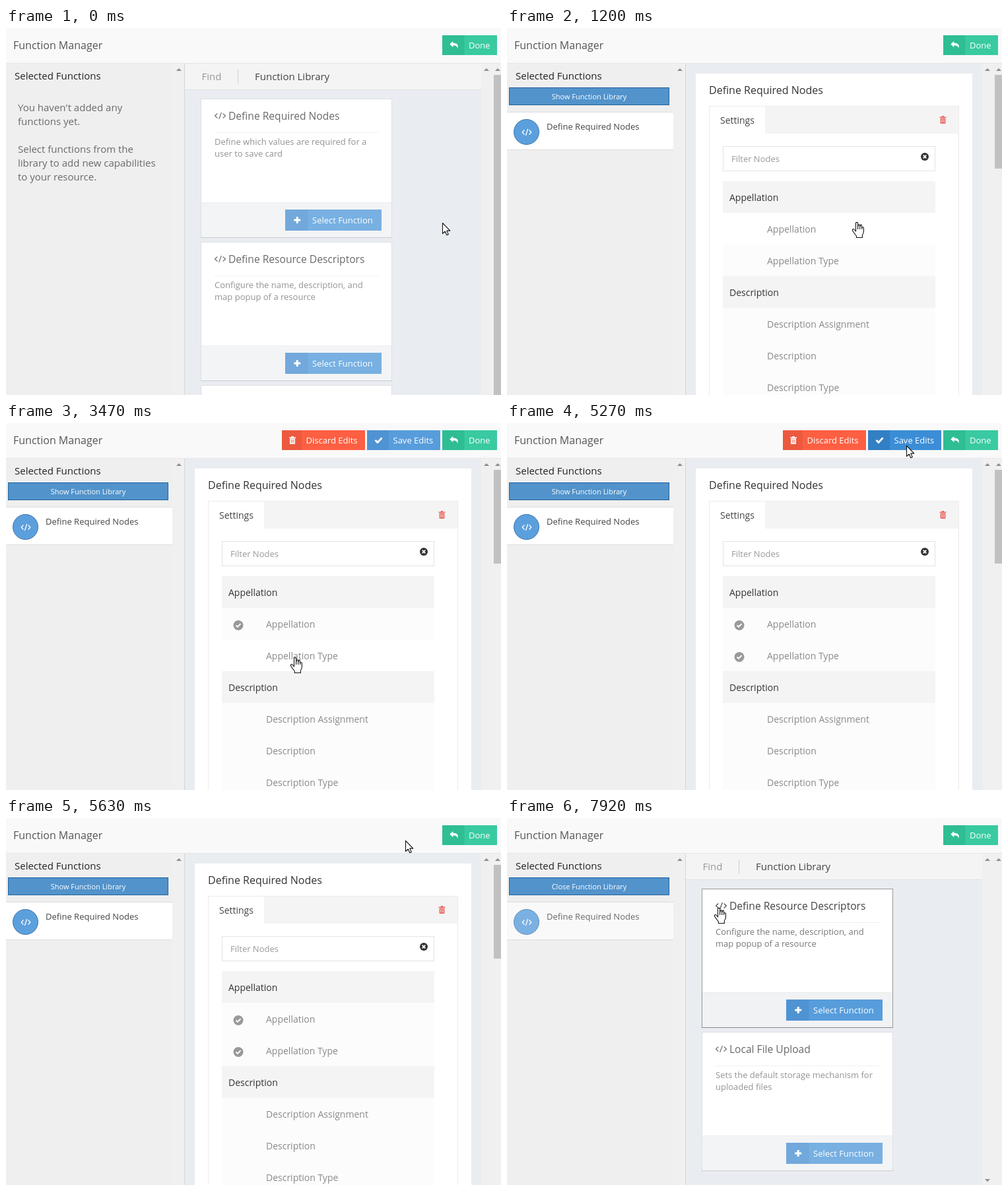
Write an HTML page that moves like this. It is 750x556 px and loops after 8000 ms.

```html
<!DOCTYPE html>
<html lang="en">
<head>
<meta charset="utf-8">
<title>Function Manager</title>
<style>
  html, body { margin: 0; width: 100%; height: 100%; overflow: hidden; background: #efefef; }
  svg { display: block; width: 100vw; height: 100vh; font-family: "Open Sans", sans-serif; }
</style>
</head>
<body>
<svg id="stage" viewBox="0 0 750 556"></svg>
<script>
const LOOP = 8000;
const stage = document.getElementById('stage');

// Moments at which the interface switches state
const PICKED = 1200, FIRST_CHECK = 2570, SECOND_CHECK = 3780;
const SAVING = 5270, SAVED = 5630, LIBRARY_AGAIN = 7530;

// Pointer moves: start, end, number of visible steps, destination
const START = [661, 295];
const MOVES = [
  [230, 830, 9, 530, 294],
  [1740, 1950, 4, 446, 304],
  [2110, 2110, 1, 442, 310],
  [3030, 3470, 7, 438, 355],
  [4240, 4970, 11, 605, 34],
  [6490, 7150, 10, 208, 107],
  [7760, 7920, 3, 321, 136],
];

const BLUE = ['#579ddb', '#4f93d3'], BLUE_HOVER = ['#3b8dd6', '#337fc4'];
const RED = ['#fd5f42', '#ec593f'], GREEN = ['#39caa2', '#2fbd94'];

const rect = (x, y, w, h, fill) =>
  `<rect x="${x}" y="${y}" width="${w}" height="${h}" fill="${fill}"/>`;
const box = (x, y, w, h, fill, stroke) =>
  `<rect x="${x + .5}" y="${y + .5}" width="${w - 1}" height="${h - 1}" fill="${fill}" stroke="${stroke}"/>`;
const text = (x, y, size, fill, str, anchor = 'start') =>
  `<text x="${x}" y="${y}" font-size="${size}" fill="${fill}" text-anchor="${anchor}">${str}</text>`;
const circle = (x, y, r, fill, extra = '') =>
  `<circle cx="${x}" cy="${y}" r="${r}" fill="${fill}" ${extra}/>`;
const path = (x, y, d, attrs) =>
  `<path transform="translate(${x} ${y})" d="${d}" ${attrs}/>`;
const line = (x, y, d, color, width) =>
  path(x, y, d, `fill="none" stroke="${color}" stroke-width="${width}"`);
const group = (opacity, content) => `<g opacity="${opacity}">${content}</g>`;
const inside = ([px, py], x, y, w, h) => px >= x && px < x + w && py >= y && py < y + h;

const icons = {
  reply: (x, y) => path(x, y, 'M-6.5-1.5L-1.5-6V-3.3C4-3.3 8-1 5 5.5C5.5 1.5 3 .5-1.5 .5V3.2Z', 'fill="#fff"'),
  check: (x, y, color = '#fff', scale = 1) => line(x, y,
    `M${-5 * scale} 0L${-1.5 * scale} ${3.5 * scale}L${5 * scale} ${-3.5 * scale}`, color, 2.8 * scale),
  plus: (x, y) => line(x, y, 'M-5 0H5M0-5V5', '#fff', 3),
  trash: (x, y, color = '#fff', slots = RED[1]) =>
    path(x, y, 'M-5-4.5H-2L-1.3-6H1.3L2-4.5H5V-3H-5ZM-4-2.5H4V4.5Q4 6 2.8 6H-2.8Q-4 6-4 4.5Z', `fill="${color}"`) +
    line(x, y, 'M-2-1V4M0-1V4M2-1V4', slots, .8),
  code: (x, y, color, s = 1) => line(x, y,
    `M${-4 * s}-3.5L${-7.5 * s} 0L${-4 * s} 3.5M${4 * s}-3.5L${7.5 * s} 0L${4 * s} 3.5M${1.8 * s}-5L${-1.8 * s} 5`, color, 1.3),
  scrollUp: x => path(x, 63, 'M-4 2H4L0-2Z', 'fill="#8b8b8b"'),
};

function button(x, y, w, h, split, [main, side], icon, label) {
  return rect(x, y, w, h, main) + rect(x, y, split, h, side) +
    icons[icon](x + split / 2 + 1, y + h / 2) +
    text(x + split + 6.5, y + h / 2 + 4.5, 13, '#fff', label);
}

function pointerAt(t) {
  let [x, y] = START;
  for (const [from, to, steps, tx, ty] of MOVES) {
    if (t < from) break;
    const gap = (to - from) / (steps - 1 || 1) || 1;
    const p = Math.min(steps, Math.floor((t - from) / gap + 1e-6) + 1) / steps;
    const eased = p * p * (3 - 2 * p);
    x += (tx - x) * eased;
    y += (ty - y) * eased;
  }
  return [x, y];
}

function pointerShape([x, y], isHand) {
  const outline = 'stroke="#111" stroke-width="1.1" stroke-linejoin="round" fill="#fff"';
  if (!isHand) return path(x + .5, y + .5, 'M0 0V16L3.7 12.6L6.3 18.3L8.8 17.2L6.3 11.6H11.3Z', outline);
  return path(x, y, 'M-1.5 14V1.8Q-1.5 .4 0 .4Q1.6 .4 1.6 1.8V7Q4-.0 4.7 7.3Q7-.0 7.7 8.2Q10.4 6.8 10.4 9.6V14' +
    'Q10.4 17 8.4 19.5V23.5H-.6V21Q-3.6 17.5-6.6 12.7Q-6.6 9.8-4 11Z', outline) +
    line(x, y, 'M1.6 7V11M4.7 7.3V11M7.7 8.2V11', '#111', 1.1);
}

function header(pointer, edited) {
  let s = rect(0, 0, 750, 53, '#f9f9f9') + rect(0, 53, 750, 1, '#e6e6e6') +
    text(11, 32, 16, '#555', 'Function Manager') +
    button(661, 11, 83, 30, 33.5, GREEN, 'reply', 'Done');
  if (edited) {
    const hover = inside(pointer, 547, 11, 111, 30);
    s += button(418, 11, 126, 30, 30, RED, 'trash', 'Discard Edits') +
      button(547, 11, 111, 30, 33, hover ? BLUE_HOVER : BLUE, 'check', 'Save Edits');
  }
  return s;
}

function sidebar(pointer, hasFunction, inLibrary) {
  let s = rect(0, 54, 270, 502, '#efefef') + rect(252, 54, 18, 502, '#f0f0f0') +
    rect(270, 54, 1, 502, '#d6d6d6') + icons.scrollUp(262) +
    text(13, 78, 15, '#222', 'Selected Functions');
  if (!hasFunction) {
    const lines = ["You haven't added any", 'functions yet.', '', 'Select functions from the',
      'library to add new capabilities', 'to your resource.'];
    return s + lines.map((l, i) => text(18, 126 + 21 * i, 15, '#6a6a6a', l)).join('');
  }
  const hover = inside(pointer, 3, 90, 243, 27);
  s += box(3, 90, 243, 27, hover ? '#1466ab' : '#5293cb', hover ? '#1466ab' : '#1f639f') +
    text(124.5, 108, 11, '#fff', (inLibrary ? 'Close' : 'Show') + ' Function Library', 'middle');
  s += rect(0, 127, 252, 58, '#ddd') + rect(0, 128, 252, 56, inLibrary ? '#f9f9f9' : '#fff');
  return s + group(inLibrary ? .8 : 1,
    circle(29.5, 157.5, 19, '#5c9fdd', 'stroke="#3c75ac"') + icons.code(30, 158, '#fff', .9) +
    text(60, 154, 13, '#444', 'Define Required Nodes'));
}

const CARDS = [
  ['Define Required Nodes', 'Define which values are required for a', 'user to save card'],
  ['Define Resource Descriptors', 'Configure the name, description, and', 'map popup of a resource'],
  ['Local File Upload', 'Sets the default storage mechanism for', 'uploaded files'],
];

function card(pointer, y, [title, ...description]) {
  const hover = inside(pointer, 295, y, 290, 211);
  const onButton = inside(pointer, 423, y + 168, 146, 32);
  return box(295, y, 290, 211, '#fff', hover ? '#999' : '#dcdfe1') +
    rect(295, y + 210, 290, 1, hover ? '#888' : '#c9cccf') +
    group(hover ? 1 : .8,
      rect(296, y + 157, 288, 53, '#f1f2f4') + rect(296, y + 157, 288, 1, '#e9eaec') +
      icons.code(324.5, y + 26, '#555', 1.05) + text(337, y + 32, 15.6, '#444', title) +
      rect(316, y + 51, 248, 1, '#eee') +
      description.map((d, i) => text(316, y + 70 + 18 * i, 13, '#777', d)).join('') +
      button(423, y + 168, 146, 32, 34.5, onButton ? BLUE_HOVER : BLUE, 'plus', 'Select Function'));
}

function library(pointer, cards) {
  return rect(271, 54, 449, 40, '#f4f4f4') + rect(271, 93, 449, 1, '#dfe1e3') +
    text(296.5, 79, 15, '#999', 'Find') + rect(351, 63, 1, 21, '#ccc') +
    text(377, 79, 15, '#444', 'Function Library') +
    cards.map((c, i) => card(pointer, 107 + 217 * i, c)).join('');
}

const ROWS = ['Appellation', 'Appellation', 'Appellation Type', 'Description',
  'Description Assignment', 'Description', 'Description Type'];
const isHeading = i => i % 3 === 0 && i < 6;

function editor(pointer, checks) {
  let s = rect(286, 69, 419, 487, '#fff') +
    text(306, 100, 16, '#333', 'Define Required Nodes') +
    box(306, 118, 379, 460, '#fff', '#ebebeb') + rect(391, 119, 293, 41, '#f4f4f4') +
    text(323, 145, 14, '#444', 'Settings') + icons.trash(660.5, 139, '#e8706b', '#f8d5d3') +
    box(327, 179, 322, 38, '#fff', '#e4e4e4') + text(340, 203, 13, '#999', 'Filter Nodes') +
    circle(633, 195, 6, '#333') + line(633, 195, 'M-2.3-2.3L2.3 2.3M2.3-2.3L-2.3 2.3', '#fff', 1.8);
  ROWS.forEach((label, i) => {
    const y = 232 + 48 * i, heading = isHeading(i);
    const hover = inside(pointer, 327, y, 322, 48);
    s += rect(327, y, 322, 48, heading ? '#f4f4f4' : hover ? '#fff' : '#fcfcfc') +
      text(heading ? 337 : 394, y + 30, 14, heading ? '#333' : '#8a8a8a', label);
    if (i && i <= checks) s += circle(352, y + 26.5, 7.5, '#999') + icons.check(352, y + 26.5, '#fff', .7);
  });
  return s;
}

function scrollbars(thumb, bottomArrow) {
  return rect(720, 54, 30, 502, '#f0f0f0') + icons.scrollUp(728) + icons.scrollUp(745) +
    (thumb ? rect(739, 71, 11, thumb, '#c1c1c1') : '') +
    (bottomArrow ? path(728, 549, 'M-4-2H4L0 2Z', 'fill="#8b8b8b"') : '');
}

function savingOverlay(t) {
  const step = Math.min(4, Math.floor((t - SAVING) / 70));
  let dots = '';
  for (let i = 0; i < 8; i++) {
    const angle = (9 - 45 * i + (step - 4) * 16) * Math.PI / 180;
    dots += circle(349.3 + 50.5 * Math.cos(angle), 295.4 + 50.5 * Math.sin(angle),
      Math.max(9.5, 16 - 2.1 * i), '#000', `fill-opacity="${Math.max(.2, .3 - .03 * i)}"`);
  }
  return group(step / 4, rect(0, 0, 750, 556, 'rgba(160,160,160,.45)') + dots);
}

function wantsHand(p, inLibrary, hasFunction) {
  if (hasFunction && (inside(p, 3, 90, 243, 27) || inside(p, 0, 127, 252, 58))) return true;
  if (inLibrary) return inside(p, 295, 107, 290, 211) || inside(p, 295, 324, 290, 211);
  return ROWS.some((_, i) => !isHeading(i) && inside(p, 327, 232 + 48 * i, 322, 48));
}

function picture(t) {
  const pointer = pointerAt(t);
  const hasFunction = t >= PICKED;
  const inLibrary = !hasFunction || t >= LIBRARY_AGAIN;
  const checks = (t >= FIRST_CHECK) + (t >= SECOND_CHECK);
  return rect(271, 54, 449, 502, '#e9edf1') +
    (inLibrary ? library(pointer, hasFunction ? CARDS.slice(1) : CARDS) : editor(pointer, checks)) +
    sidebar(pointer, hasFunction, inLibrary) +
    scrollbars(!hasFunction ? 485 : inLibrary ? 0 : 142, hasFunction && inLibrary) +
    header(pointer, t >= FIRST_CHECK && t < SAVED) +
    (t >= SAVING && t < SAVED ? savingOverlay(t) : '') +
    pointerShape(pointer, wantsHand(pointer, inLibrary, hasFunction));
}

let shown = '';
const begin = performance.now();
function tick() {
  const next = picture((performance.now() - begin) % LOOP);
  if (next !== shown) stage.innerHTML = shown = next;
  requestAnimationFrame(tick);
}
tick();
</script>
</body>
</html>
```
